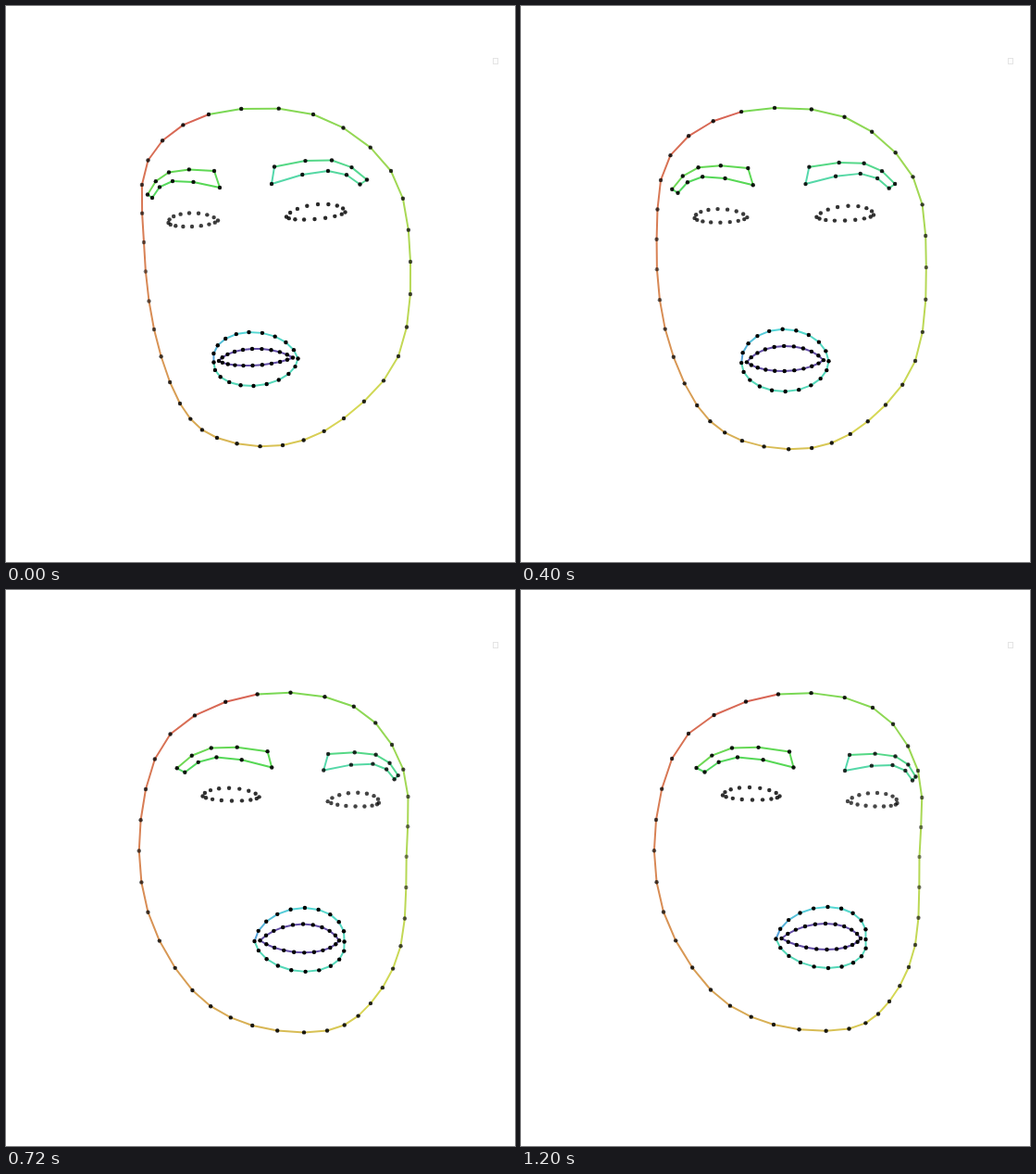
Write an HTML page with a canvas that moves like this. It is 550x600 px and loops after 1.28 s.

```html
<!DOCTYPE html>
<html lang="en">
<head>
<meta charset="utf-8">
<title>Face outline</title>
<style>
html, body { margin: 0; height: 100%; overflow: hidden; background: #fff; }
canvas { display: block; }
</style>
</head>
<body>
<canvas id="stage" width="550" height="600"></canvas>
<script>
const ctx = document.getElementById('stage').getContext('2d');
const LOOP = 1280, STEP = 80;

const mix = (a, b, u) => a + (b - a) * u;
const hue = (from, to, power = 1) => k => `hsl(${mix(to, from, (1 - k) ** power)},63%,59%)`;

// Points on a rounded arc a-m-b; `round` 1 spaces them as on an ellipse, 0 evenly.
function arc(a, m, b, steps, round, count = steps) {
  return Array.from({ length: count }, (_, i) => {
    const s = i / steps;
    const along = mix(s, (1 - Math.cos(Math.PI * s)) / 2, round);
    const rise = Math.sin(Math.PI * s);
    return [0, 1].map(j => mix(a[j], b[j], along) + (m[j] - (a[j] + b[j]) / 2) * rise);
  });
}

// Closed Catmull-Rom curve with `steps` points per span.
function spline(keys, steps) {
  const n = keys.length;
  return Array.from({ length: n * steps }, (_, i) => {
    const t = i % steps / steps, k = Math.floor(i / steps);
    const [p, q, r, s] = [n - 1, 0, 1, 2].map(o => keys[(k + o) % n]);
    return [0, 1].map(j => q[j] + t / 2 * (r[j] - p[j]
      + t * (2 * p[j] - 5 * q[j] + 4 * r[j] - s[j] + t * (3 * (q[j] - r[j]) + s[j] - p[j]))));
  });
}

const oval = k => spline(k, 3);
const brow = k => [...arc(k[0], k[1], k[2], 4, 0, 5), ...arc(k[3], k[4], k[5], 4, 0, 5)];
const almond = (steps, round) => k =>
  [...arc(k[0], k[1], k[2], steps, round), ...arc(k[2], k[3], k[0], steps, round)];

// Keys are [x, y] with the head turned one way, then [x, y] turned the other way.
const features = [
  {
    shape: oval, line: hue(103, 6, 1.15), stretch: .012,
    // dots near the ears are further away and paler
    dot: (u, x, y) => .88 - Math.max(0, 1 - Math.abs(y - 285) / 170) * (x < 290 ? .38 - .15 * u : .2 + .25 * u),
    keys: [
      [219, 117, 278, 112.5], [332, 117, 380, 127], [416, 178, 429, 195], [437, 276, 430.5, 288],
      [424, 378, 426, 383], [365, 445, 398, 444], [299, 474, 354.5, 473.5], [228, 466, 273, 469],
      [188, 429, 205, 431.5], [160, 349, 154, 347.5], [149, 255, 146, 248], [153.5, 166.5, 181, 155]
    ]
  },
  {
    shape: brow, line: hue(108, 130), dot: () => .9,
    keys: [
      [153, 203.5, 189.5, 192], [176, 179.5, 228, 170.5], [225, 178, 290, 174.5],
      [231, 196, 294.5, 191.5], [180, 189, 234, 180.5], [158, 207, 198.5, 196.5]
    ]
  },
  {
    shape: brow, line: hue(142, 162), dot: u => .9 - .1 * u,
    keys: [
      [290, 173.5, 355, 178], [352, 166.5, 404.5, 179.5], [390, 187.5, 426.5, 201.5],
      [382.5, 192.5, 423, 205.5], [348, 178, 401.5, 189], [287, 192, 350, 195]
    ]
  },
  { // left eye
    shape: almond(8, .85), dot: u => .76 + .06 * u,
    keys: [[175.5, 234, 218, 221.5], [198, 223.5, 247, 213], [229, 231.5, 279.5, 222.5], [201, 238, 250, 226.5]]
  },
  { // right eye
    shape: almond(8, .85), dot: u => .84 - .12 * u,
    keys: [[303, 227.5, 353, 228], [337, 214, 385, 219], [366.5, 222.5, 406.5, 230], [333.5, 230, 382.5, 233.5]]
  },
  { // outer lips
    shape: almond(10, 1), line: hue(205, 165, 4), dot: () => 1, open: .1,
    keys: [[224.5, 384.5, 275.5, 376.5], [262.5, 352, 331.5, 342], [315.5, 380.5, 372.5, 377], [267.5, 410, 332, 408]]
  },
  { // inner lips
    shape: almond(10, .5), line: () => 'hsl(254,36%,48%)', dot: () => 1, open: .3,
    keys: [[230, 383, 281.5, 376], [266, 370, 329, 360], [310, 379.5, 367, 376], [266.5, 388, 330.5, 388]]
  }
];

// The turn carries points along shallow curves, and the mouth opens halfway.
function pose({ shape, keys, stretch = .025, open = 0 }, u) {
  const swing = u * (1 - u) * 4.25;
  return shape(keys.map(([x0, y0, x1, y1]) => {
    const x = mix(x0, x1, u), y = mix(y0, y1, u);
    return [
      x + swing * (.018 * (x - 270) - .013 * (y - 290)),
      y + swing * (.8 + .013 * (x - 290) + stretch * (y - 270) + open * (y - 378))
    ];
  }));
}

function drawFeature(feature, u) {
  const points = pose(feature, u), n = points.length;
  if (feature.line) {
    points.forEach((p, i) => {
      ctx.strokeStyle = feature.line(i / n);
      ctx.beginPath();
      ctx.moveTo(...p);
      ctx.lineTo(...points[(i + 1) % n]);
      ctx.stroke();
    });
  }
  for (const [x, y] of points) {
    ctx.fillStyle = `rgba(0,0,0,${feature.dot(u, x, y)})`;
    ctx.beginPath();
    ctx.arc(x, y, 2.2, 0, Math.PI * 2);
    ctx.fill();
  }
}

function draw(now) {
  const t = Math.floor(now % LOOP / STEP) * STEP;
  const turn = 1 - Math.exp(-((t / 565) ** 3));
  ctx.fillStyle = '#fff';
  ctx.fillRect(0, 0, 550, 600);
  ctx.lineWidth = 1;
  ctx.strokeStyle = '#e4e4e4';
  ctx.strokeRect(526.5, 56.5, 5, 6);
  ctx.lineWidth = 2;
  ctx.lineCap = 'round';
  for (const feature of features) drawFeature(feature, turn);
}

const start = performance.now();
function tick() {
  draw(performance.now() - start);
  requestAnimationFrame(tick);
}
tick();
</script>
</body>
</html>
```
